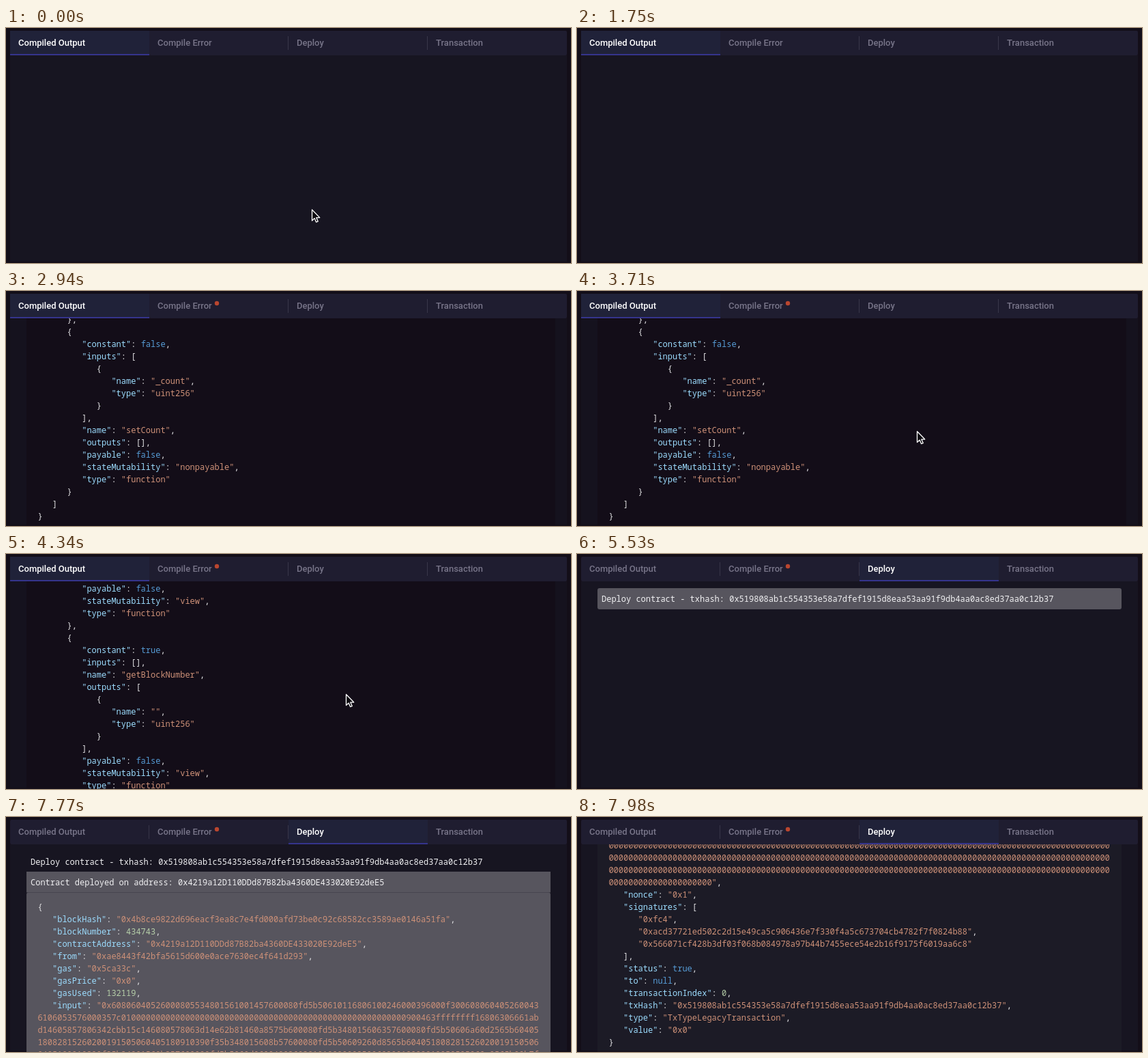
Animation, 828 px wide and 344 px high, one loop 8000 ms. Source, as an HTML page:

```html
<!DOCTYPE html>
<html lang="en">
<head>
<meta charset="utf-8">
<title>Contract console</title>
<style>
  html, body { margin: 0; width: 828px; height: 344px; overflow: hidden; background: #130e18; }
  svg { display: block; }
  .tab { font: 500 13px Roboto, sans-serif; }
  .code { font: 12px "Roboto Mono", "Noto Sans Mono", monospace; white-space: pre; }
</style>
</head>
<body>
<svg id="stage" width="828" height="344" viewBox="0 0 828 344">
  <defs><clipPath id="view"><rect y="40" width="828" height="304"/></clipPath></defs>
</svg>
<script>
const LOOP = 8000, STEP = 70, COLS = 102, LINE = 18, LAST_LINE = 330;
const COMPILED_AT = 2100, DEPLOY_AT = 5460, RECEIPT_AT = 7700, FLASH = 300;
const COLORS = { key: '#9cdcfe', string: '#ce9178', word: '#569cd6', number: '#b5cea8', plain: '#e2e2e4' };
const stage = document.getElementById('stage');

function add(parent, name, attrs = {}, text) {
  const el = document.createElementNS('http://www.w3.org/2000/svg', name);
  for (const k in attrs) el.setAttribute(k, attrs[k]);
  if (text !== undefined) el.textContent = text;
  parent.appendChild(el);
  return el;
}
const box = (parent, x, y, width, height, fill, rx = 0) =>
  add(parent, 'rect', { x, y, width, height, fill, rx });
const show = (el, on) => el.setAttribute('visibility', on ? 'inherit' : 'hidden');
const clamp = v => Math.max(0, Math.min(1, v));

function randomHex(length, seed) {
  let out = '';
  while (out.length < length) {
    seed = (seed * 16807) % 2147483647;
    out += (seed % 16).toString(16);
  }
  return out;
}

const bytecode = '0x608060405260008055348015610014576000' +
  '80fd5b50610116806100246000396000f300608060405260043' +
  '6106053576000357c01' + '0'.repeat(56) + '900463ffffffff16806306661ab' +
  'd14605857806342cbb15c146080578063d14e62b81460a8575b600080fd5b348015606357600080fd5b50606a60d2565b60405' +
  '180828152602001915050604051809' + '10390f35b348015608b57600080fd5b50609260d8565b604051808281526020019150506' +
  '0405180910390f35b34801560b357600080fd5b5060d06004803603810190808035906020019092919050505060e0565b00' +
  randomHex(131, 77) + '0029';

const abiEntry = (constant, inputs, name, outputs, stateMutability) =>
  ({ constant, inputs, name, outputs, payable: false, stateMutability, type: 'function' });
const uint = name => [{ name, type: 'uint256' }];
const compiled = {
  bytecode,
  abi: [
    abiEntry(true, [], 'count', uint(''), 'view'),
    abiEntry(true, [], 'getBlockNumber', uint(''), 'view'),
    abiEntry(false, uint('_count'), 'setCount', [], 'nonpayable')
  ]
};

const txHash = '0x519808ab1c554353e58a7dfef1915d8eaa53aa91f9db4aa0ac8ed37aa0c12b37';
const contractAddress = '0x4219a12D110DDd87B82ba4360DE433020E92deE5';
const receipt = {
  blockHash: '0x4b8ce9822d696eacf3ea8c7e4fd000afd73be0c92c68582cc3589ae0146a51fa',
  blockNumber: 434743,
  contractAddress,
  from: '0xae8443f42bfa5615d600e0ace7630ec4f641d293',
  gas: '0x5ca33c',
  gasPrice: '0x0',
  gasUsed: 132119,
  input: bytecode,
  logs: [],
  logsBloom: '0x' + '0'.repeat(512),
  nonce: '0x1',
  signatures: [
    '0xfc4',
    '0xacd37721ed502c2d15e49ca5c906436e7f330f4a5c673704cb4782f7f0824b88',
    '0x566071cf428b3df03f068b084978a97b44b7455ece54e2b16f9175f6019aa6c8'
  ],
  status: true,
  to: null,
  transactionIndex: 0,
  txHash,
  type: 'TxTypeLegacyTransaction',
  value: '0x0'
};

function tokens(row) {
  const pattern = /("[^"]*")(?=:)|("[^"]*")|(true|false|null)|(\d+)|([^"\w]+)/g;
  return [...row.matchAll(pattern)].map(m => [m[0],
    m[1] ? COLORS.key : m[2] ? COLORS.string : m[3] ? COLORS.word : m[4] ? COLORS.number : COLORS.plain]);
}

// Draws highlighted JSON wrapped at COLS; returns the centre of its last line.
function drawJson(parent, data, y) {
  const newLine = () => add(parent, 'text', { class: 'code', x: 46.4, y: y + 4 });
  for (const row of JSON.stringify(data, null, 3).split('\n')) {
    let line = newLine(), col = 0;
    for (let [text, fill] of tokens(row)) {
      while (text) {
        if (col === COLS) { y += LINE; line = newLine(); col = 0; }
        const part = text.slice(0, COLS - col);
        add(line, 'tspan', { fill }, part);
        col += part.length;
        text = text.slice(part.length);
      }
    }
    y += LINE;
  }
  return y - LINE;
}
const message = (parent, y, text) =>
  add(parent, 'text', { class: 'code', x: 36, y: y + 4, fill: '#f0f0f2' }, text);

box(stage, 0, 0, 828, 344, '#130e18');
const panel = box(stage, 6, 40, 816, 302, '#171521');
const view = add(stage, 'g', { 'clip-path': 'url(#view)' });

const compilePane = add(view, 'g');
box(compilePane, 30, -600, 775, 2400, '#130d18');
const compileFlash = box(compilePane, 30, 50, 769, 1600, '#fff', 3);
const compileScroll = drawJson(compilePane, compiled, 72) - LAST_LINE;

const deployPane = add(view, 'g');
const deployFlash = box(deployPane, 30, 50, 768, 31, '#fff', 3);
message(deployPane, 66, 'Deploy contract - txhash: ' + txHash);
const receiptPane = add(deployPane, 'g');
const receiptFlash = add(receiptPane, 'g');
box(receiptFlash, 30, 80, 768, 30.5, '#fff');
box(receiptFlash, 30, 110.5, 768, 1600, '#fff', 3);
message(receiptPane, 96, 'Contract deployed on address: ' + contractAddress);
const receiptScroll = drawJson(receiptPane, receipt, 132) - LAST_LINE;

box(stage, 6, 4, 816, 36, '#1f1d30', 2);
const tabs = ['Compiled Output', 'Compile Error', 'Deploy', 'Transaction'].map((label, i) => {
  const x = 6 + 204 * i;
  const active = add(stage, 'g');
  box(active, x, 4, 204, 36, '#202239');
  box(active, x, 38, 204, 2, '#35348c');
  const divider = box(stage, x + 203, 12, 1, 20, i < 3 ? '#383649' : 'none');
  const text = add(stage, 'text', { class: 'tab', x: x + 12, y: 26 }, label);
  return { active, divider, text };
});
const errorDot = add(stage, 'circle', { cx: 309, cy: 18, r: 3.2, fill: '#b9462f' });

const cursor = add(stage, 'path', {
  d: 'M0 0V16L3.7 12.6 6.1 18.2 8.7 17.1 6.3 11.6H11.3Z',
  fill: '#0c0910', stroke: '#fff', 'stroke-width': 1.3, 'stroke-linejoin': 'round'
});

const HOME = [448.5, 266], READ = [498.5, 205.5], AWAY = [845, 150];
const moves = [
  [70, 490, HOME, AWAY],
  [2940, 3640, AWAY, READ],
  [4970, 5390, READ, AWAY]
];
function cursorAt(t) {
  let at = HOME;
  for (const [start, end, from, to] of moves) {
    if (t < start) break;
    const p = clamp((t - start) / (end - start)), e = p * p * (3 - 2 * p);
    at = from.map((v, i) => v + (to[i] - v) * e);
  }
  return at;
}

const flash = (el, age) => el.setAttribute('opacity', age < 0 ? 0 : 0.36 * clamp(1 - age / FLASH));
const scrollTo = (el, y) => el.setAttribute('transform', `translate(0 ${-y})`);

function render(time) {
  const t = Math.floor(time / STEP) * STEP;
  const deploying = t >= DEPLOY_AT, compiledShown = t >= COMPILED_AT && !deploying;

  tabs.forEach(({ active, divider, text }, i) => {
    const on = i === (deploying ? 2 : 0);
    show(active, on);
    show(divider, !on);
    text.setAttribute('fill', on ? '#fff' : '#787589');
  });
  show(errorDot, t >= COMPILED_AT);
  panel.setAttribute('fill', compiledShown ? '#15121e' : '#171521');

  show(compilePane, compiledShown);
  flash(compileFlash, t - COMPILED_AT);
  const back = 440 * (1 - Math.pow(1 - clamp((t - 3780) / 910), 1.32));
  scrollTo(compilePane, t < COMPILED_AT + 140 ? 0 : compileScroll - back);

  show(deployPane, deploying);
  flash(deployFlash, t - DEPLOY_AT);
  show(receiptPane, t >= RECEIPT_AT);
  flash(receiptFlash, t - RECEIPT_AT);
  scrollTo(deployPane, t < RECEIPT_AT + 140 ? 0 : receiptScroll);

  cursor.setAttribute('transform', `translate(${cursorAt(t).join(' ')})`);
}

const began = performance.now();
function tick() {
  render((performance.now() - began) % LOOP);
  requestAnimationFrame(tick);
}
tick();
</script>
</body>
</html>
```
